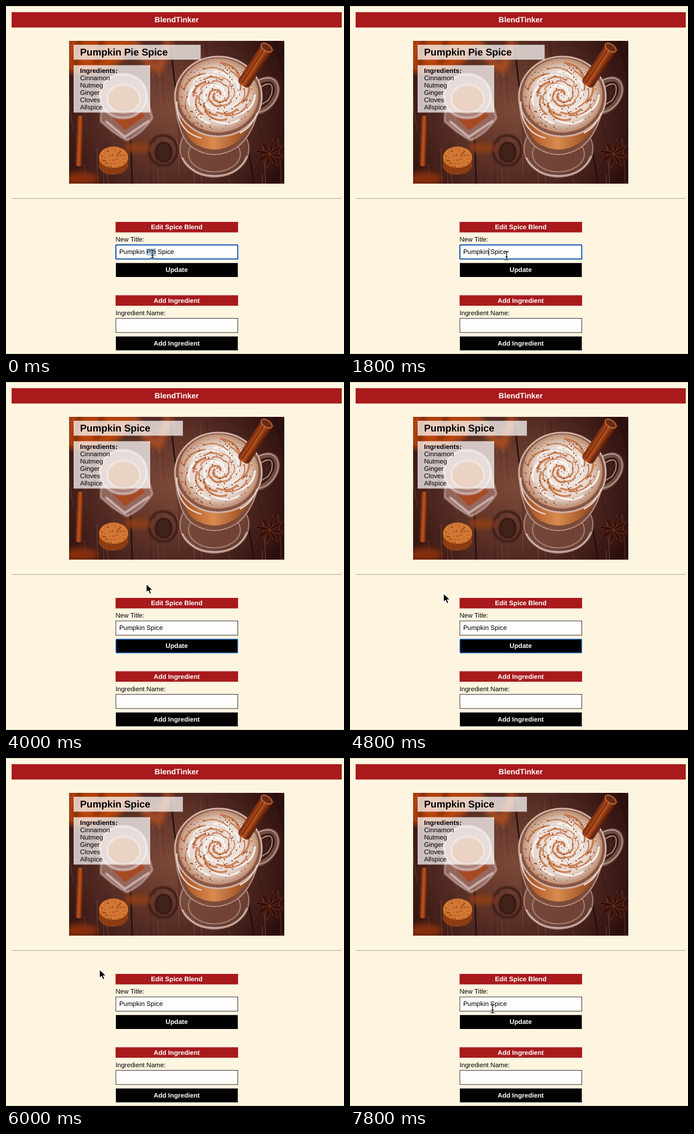
These frames come from a looping animation (600 by 619 pixels, 8000 ms). An HTML page:

```html
<!DOCTYPE html>
<html lang="en">
<head>
<meta charset="utf-8">
<title>Spice blend editor</title>
<style>
  html, body { margin: 0; width: 100%; height: 100%; overflow: hidden; background: #fef5e1; }
  svg { display: block; width: 600px; height: 619px; }
  text { font: 11.6px "Liberation Sans", Arial, sans-serif; text-rendering: geometricPrecision; white-space: pre; }
  .bold { font-weight: bold; }
  .heading { font-weight: bold; fill: #fff; text-anchor: middle; }
  .brand { font-size: 13.6px; }
  .title { font-size: 17.4px; font-weight: bold; }
  .bar { fill: #a81a1c; }
  .panel { fill: #fff; fill-opacity: .72; }
  .field { fill: #fffdfb; stroke: #3f3033; }
  .filler { font-size: 45px; font-weight: bold; letter-spacing: 8px; text-anchor: middle; stroke: #000; stroke-width: 1.4px; }

  .timed { animation: 8s step-end infinite; }
  .selection  { animation-name: selection; }
  .spaced     { animation-name: spaced; }
  .caret      { animation-name: caret; }
  .edited     { animation-name: edited; }
  .input-ring { animation-name: input-ring; }
  .hover      { animation-name: hover; }
  .press-ring { animation-name: press-ring; }
  .focus-ring { animation-name: focus-ring; }
  .old-title  { animation-name: old-title; }
  .new-title  { animation-name: new-title; }
  .photo      { animation-name: photo; }
  .empty      { animation-name: empty; }
  .card       { animation-name: card; }
  .beam       { animation-name: beam; }
  .hand       { animation-name: hand; }
  .arrow      { animation-name: arrow; }
  .pointer    { animation: pointer 8s linear infinite; }

  @keyframes selection  { 0% { opacity: 1 } 12.5%, 100% { opacity: 0 } }
  @keyframes spaced     { 0% { opacity: 0 } 12.5% { opacity: 1 } 15%, 100% { opacity: 0 } }
  @keyframes caret      { 0% { opacity: 0 } 15% { opacity: 1 } 32.5%, 100% { opacity: 0 } }
  @keyframes edited     { 0% { opacity: 0 } 15%, 100% { opacity: 1 } }
  @keyframes input-ring { 0% { opacity: 1 } 32.5%, 100% { opacity: 0 } }
  @keyframes hover      { 0% { opacity: 0 } 30% { opacity: 1 } 42.5%, 100% { opacity: 0 } }
  @keyframes press-ring { 0% { opacity: 0 } 32.5% { opacity: 1 } 42.5%, 100% { opacity: 0 } }
  @keyframes focus-ring { 0% { opacity: 0 } 42.5% { opacity: 1 } 65%, 100% { opacity: 0 } }
  @keyframes old-title  { 0% { opacity: 1 } 37.5%, 100% { opacity: 0 } }
  @keyframes new-title  { 0% { opacity: 0 } 37.5%, 100% { opacity: 1 } }
  @keyframes photo      { 0% { opacity: 1 } 65% { opacity: 0 } 72.5%, 100% { opacity: 1 } }
  @keyframes empty      { 0% { opacity: 0 } 65% { opacity: 1 } 72.5%, 100% { opacity: 0 } }
  @keyframes card       { 0% { transform: none } 65% { transform: translateX(63.7px) } 72.5%, 100% { transform: none } }
  @keyframes beam       { 0% { opacity: 1 } 30% { opacity: 0 } 42.5% { opacity: 1 } 45% { opacity: 0 } 95%, 100% { opacity: 1 } }
  @keyframes hand       { 0% { opacity: 0 } 30% { opacity: 1 } 42.5%, 100% { opacity: 0 } }
  @keyframes arrow      { 0% { opacity: 0 } 45% { opacity: 1 } 95%, 100% { opacity: 0 } }
  @keyframes pointer {
    0%          { transform: translate(260px, 441px) }
    7.5%        { transform: translate(260px, 441px); animation-timing-function: steps(3) }
    15%         { transform: translate(278px, 444px) }
    25%         { transform: translate(278px, 444px); animation-timing-function: steps(3) }
    32.5%       { transform: translate(296px, 474px) }
    40%         { transform: translate(296px, 474px); animation-timing-function: steps(4) }
    50%         { transform: translate(249px, 359px); animation-timing-function: steps(4) }
    60%         { transform: translate(166px, 376px) }
    85%         { transform: translate(166px, 376px); animation-timing-function: steps(5) }
    97.5%, 100% { transform: translate(253px, 446px) }
  }
</style>
</head>
<body>
<svg viewBox="0 0 600 619">
  <defs>
    <clipPath id="frame"><rect x="112.5" y="62" width="381.5" height="253.5"/></clipPath>
    <clipPath id="cup"><ellipse cx="377" cy="159" rx="71" ry="66"/></clipPath>
    <filter id="soft" x="-30%" y="-30%" width="160%" height="160%"><feGaussianBlur stdDeviation="5"/></filter>
    <filter id="fine"><feGaussianBlur stdDeviation=".8"/></filter>
    <radialGradient id="wood" gradientUnits="userSpaceOnUse" cx="290" cy="185" r="225">
      <stop offset="0" stop-color="#7b4939"/><stop offset=".45" stop-color="#5d3127"/><stop offset="1" stop-color="#2c100e"/>
    </radialGradient>
    <radialGradient id="cream">
      <stop offset="0" stop-color="#eee5e2"/><stop offset=".7" stop-color="#e6d9d2"/><stop offset="1" stop-color="#bd8c70"/>
    </radialGradient>
    <linearGradient id="coffee" x1="0" x2="1">
      <stop offset="0" stop-color="#a74e1d"/><stop offset=".45" stop-color="#d98c50"/><stop offset="1" stop-color="#8d3d17"/>
    </linearGradient>
    <linearGradient id="stick" x1="0" x2="1">
      <stop offset="0" stop-color="#74270d"/><stop offset=".45" stop-color="#bb5720"/><stop offset="1" stop-color="#4e1708"/>
    </linearGradient>
  </defs>

  <rect width="600" height="619" fill="#fef5e1"/>
  <path d="M0 .5H600M0 618.5H600" stroke="#d6d0c3"/>
  <rect class="bar" x="10" y="11" width="586" height="27.3"/>
  <text class="heading brand" x="303" y="29">BlendTinker</text>
  <path d="M10 342.3H596" stroke="#a3a09b"/>

  <g class="timed photo" clip-path="url(#frame)">
    <rect x="112" y="62" width="383" height="254" fill="url(#wood)"/>
    <g id="grain" fill="none"></g>
    <g fill="none" stroke="#24100d" stroke-width="2.5">
      <path d="M221 230L224 316M291 62L301 150M427 235L440 316M478 62L494 130"/>
    </g>
    <g fill="none" stroke="#2f1712" filter="url(#fine)">
      <ellipse cx="279" cy="257" rx="25" ry="27" stroke="#3d1e17" stroke-width="4"/>
      <ellipse cx="280" cy="260" rx="14" ry="17" fill="#402018" stroke-width="3"/>
    </g>
    <g filter="url(#soft)">
      <path d="M108 58H222Q216 104 178 111Q140 128 108 115Z" fill="#b74408"/>
      <path d="M132 60Q122 85 125 114M171 60L160 104" stroke="#642006" stroke-width="8"/>
      <path d="M222 60L262 111M290 60L268 119" stroke="#a64c20" stroke-width="15"/>
      <ellipse cx="234" cy="252" rx="24" ry="9" fill="#8a3d16"/>
      <ellipse cx="133" cy="307" rx="31" ry="12" fill="#842e0c"/>
    </g>
    <rect x="125" y="195" width="12" height="90" rx="4" fill="url(#stick)" transform="rotate(2 131 240)"/>

    <g filter="url(#fine)">
      <path d="M170 165L168 205Q194 229 215 239Q244 225 260 199L245 145Z" fill="#a6796e" fill-opacity=".75" stroke="#cdb5b0" stroke-width="2"/>
      <path d="M181 190L211 221L247 196L232 174Z" fill="#a74a20"/>
      <path d="M177 205L211 233L254 204" fill="none" stroke="#d9c8c8" stroke-width="3"/>
      <ellipse cx="208" cy="160" rx="42" ry="39" fill="#aa8178" stroke="#d3bfba" stroke-width="3"/>
      <ellipse cx="209" cy="165" rx="29" ry="25" fill="#b6602c" stroke="#dfc5b5" stroke-width="2"/>
    </g>
    <path d="M165 274V286Q169 301 192 300Q215 298 217 284V268Z" fill="#8b3c13"/>
    <ellipse cx="191" cy="269" rx="26" ry="19" fill="#d27732"/>
    <g id="cork" fill="#8c3e17"></g>

    <g fill="none" stroke="#b58d80" stroke-opacity=".8">
      <path d="M447 136Q466 124 477 134Q488 149 474 170Q463 186 446 189" stroke-width="9" stroke-opacity=".45"/>
      <path d="M445 134Q466 122 478 133Q490 149 475 172Q464 187 445 190M451 145Q467 134 472 142Q475 155 465 168L449 178" stroke-width="1.8" stroke="#d0b4a9"/>
      <ellipse cx="370" cy="254" rx="61" ry="50" fill="#895d4f" fill-opacity=".5" stroke-width="2.5"/>
      <ellipse cx="370" cy="263" rx="46" ry="32" fill="#754434" fill-opacity=".5" stroke-width="2"/>
      <path d="M313 270Q332 304 374 302Q414 300 428 267" stroke="#d9c1b7" stroke-width="3"/>
    </g>
    <path d="M300 169Q306 236 333 253Q371 276 409 252Q439 231 451 173Z" fill="#7c4b3c" stroke="#b99484" stroke-width="2"/>
    <path d="M312 202Q317 233 338 247Q372 264 403 246Q427 232 437 199Z" fill="url(#coffee)"/>
    <ellipse cx="377" cy="161" rx="77" ry="71" fill="#895444" stroke="#ceb2a5" stroke-width="3"/>
    <ellipse cx="377" cy="159" rx="71" ry="66" fill="url(#cream)"/>
    <g clip-path="url(#cup)">
      <g id="swirls" fill="none" stroke-linecap="round"></g>
      <g id="sprinkles" fill="#963b13"></g>
    </g>
    <path d="M303 170Q303 224 347 235M446 190Q436 216 415 226" fill="none" stroke="#e2d0c7" stroke-width="2.5"/>
    <g transform="translate(442 106) rotate(33)">
      <rect x="-11" y="-42" width="23" height="84" rx="7" fill="url(#stick)"/>
      <path d="M-2 -37V39M7 -37V36" stroke="#752a0e" stroke-width="2"/>
      <ellipse cy="-38" rx="11" ry="6" fill="#6b2a12" stroke="#b9693b" stroke-width="2"/>
    </g>
    <g id="anise" fill="#351009" stroke="#642b1c"></g>
  </g>

  <g class="timed empty">
    <rect x="176" y="62" width="254" height="253.5" fill="#ececec"/>
    <g transform="translate(302.5 0) scale(.43 1)">
      <text class="filler" y="157">Image</text>
      <text class="filler" y="202.5">goes</text>
      <text class="filler" y="248">here</text>
    </g>
  </g>

  <g class="timed card">
    <g class="timed old-title">
      <rect class="panel" x="120" y="69" width="225.5" height="26.5"/>
      <text class="title" x="131.5" y="88">Pumpkin Pie Spice</text>
    </g>
    <g class="timed new-title">
      <rect class="panel" x="120" y="69" width="194" height="26.5"/>
      <text class="title" x="131.5" y="88">Pumpkin Spice</text>
    </g>
    <rect class="panel" x="120" y="105.3" width="136" height="84.2"/>
    <text class="bold" x="131.5" y="118.5">Ingredients:</text>
    <text x="131.5" y="131.6">Cinnamon</text>
    <text x="131.5" y="144.7">Nutmeg</text>
    <text x="131.5" y="157.8">Ginger</text>
    <text x="131.5" y="170.9">Cloves</text>
    <text x="131.5" y="184">Allspice</text>
  </g>

  <rect class="bar" x="194.5" y="384" width="217.5" height="18.7"/>
  <text class="heading" x="303" y="397.2">Edit Spice Blend</text>
  <text x="194.5" y="418.7">New Title:</text>
  <rect class="field" x="195" y="425" width="216.5" height="25.3"/>
  <rect class="timed input-ring" x="195.1" y="425.1" width="216.3" height="25" rx="1.5" fill="#fffdfb" stroke="#1c5cb8" stroke-width="2"/>
  <g class="timed selection">
    <rect x="249.2" y="431" width="17.5" height="13" fill="#aecdf5"/>
    <text x="201" y="441.2">Pumpkin Pie Spice</text>
  </g>
  <text class="timed spaced" x="201" y="441.2">Pumpkin  Spice</text>
  <text class="timed edited" x="201" y="441.2">Pumpkin Spice</text>
  <path class="timed caret" d="M246.6 431V444" stroke="#000"/>

  <rect x="195" y="457.2" width="216.5" height="24.8"/>
  <rect class="timed hover" x="195" y="457.2" width="216.5" height="24.8" fill="#1a1a1a"/>
  <rect class="timed press-ring" x="195.3" y="457.6" width="215.8" height="24.2" rx="1.5" fill="none" stroke="#b9c7df" stroke-width="1.4"/>
  <rect class="timed focus-ring" x="195.3" y="457.6" width="215.8" height="24.2" rx="1.5" fill="none" stroke="#1c5cb8" stroke-width="1.6"/>
  <text class="heading" x="303" y="473.3">Update</text>

  <rect class="bar" x="194.5" y="514.5" width="217.5" height="18.7"/>
  <text class="heading" x="303" y="527.7">Add Ingredient</text>
  <text x="194.5" y="549.5">Ingredient Name:</text>
  <rect class="field" x="195" y="555.6" width="216.5" height="25.2"/>
  <rect x="195" y="587.8" width="216.5" height="24.7"/>
  <text class="heading" x="303" y="604">Add Ingredient</text>

  <g class="pointer" stroke-linejoin="round">
    <g class="timed beam" fill="none">
      <path id="stem" d="M-3.5 -7.5Q0 -7.5 0 -5Q0 -7.5 3.5 -7.5M0 -5V5M-3.5 7.5Q0 7.5 0 5Q0 7.5 3.5 7.5M-2 2.5H2" stroke="#fff" stroke-width="2.6"/>
      <use href="#stem" style="stroke:#111"/>
      <path d="M-3.5 -7.5Q0 -7.5 0 -5Q0 -7.5 3.5 -7.5M0 -5V5M-3.5 7.5Q0 7.5 0 5Q0 7.5 3.5 7.5M-2 2.5H2" stroke="#111" stroke-width="1.3"/>
    </g>
    <g class="timed hand">
      <path d="M-3.5 1Q-2 -1 0 1L2 7Q3 4.5 5 6.5Q7 5 8 7.5Q10 7 10.5 9.5Q12 14 8.5 18H1.5Q-1 14 -5 11Q-7 8.5 -4.5 8L-1.5 9.5Z" fill="#fff" stroke="#111" stroke-width="1.2"/>
      <path d="M3 11V15M5.3 11V15M7.5 11V15" stroke="#111" stroke-width=".8"/>
    </g>
    <path class="timed arrow" d="M0 0V15.5L3.6 12.2L6.2 18L9 16.8L6.5 11.2H11.3Z" fill="#000" stroke="#fff" stroke-width="1.1"/>
  </g>
</svg>
<script>
  let seed = 17;
  const random = () => (seed = seed * 16807 % 2147483647) / 2147483647;
  const between = (low, high) => low + (high - low) * random();
  const fill = (id, count, draw) => {
    document.getElementById(id).innerHTML = Array.from({ length: count }, (_, i) => draw(i)).join("");
  };
  const dot = (cx, cy, radius) => {
    const angle = random() * 2 * Math.PI, reach = radius * Math.sqrt(random());
    return `<circle cx="${cx + reach * Math.cos(angle)}" cy="${cy + reach * Math.sin(angle) * .9}" r="${between(.4, 1.3)}"/>`;
  };

  fill("grain", 90, () => {
    const x = between(112, 494), y = between(60, 300), length = between(25, 120);
    const color = random() < .55 ? "#30150f" : "#926051";
    return `<path d="M${x} ${y}q${between(-4, 6)} ${length / 2} ${length * .07} ${length}"
      stroke="${color}" stroke-width="${between(.5, 2)}" opacity="${between(.15, .45)}"/>`;
  });
  fill("cork", 45, () => dot(191, 270, 21));
  // Broken arcs follow an inward spiral of whipped cream.
  fill("swirls", 46, i => {
    const radius = 66 - i * 1.35, start = i * 2.4;
    const point = (turn, shrink) => {
      const angle = start + turn, reach = radius * shrink;
      return `${376 + reach * Math.cos(angle)} ${158 + reach * .9 * Math.sin(angle)}`;
    };
    const color = i % 3 ? "#c56a32" : "#fff9f5";
    return `<path d="M${point(0, 1)}Q${point(.45, 1.08)} ${point(.9, .78)}"
      stroke="${color}" stroke-width="${between(1.5, 4)}" opacity=".8"/>`;
  });
  fill("sprinkles", 240, () => dot(374, 160, 68));
  fill("anise", 8, i => `<path transform="translate(468 263) rotate(${i * 45 + 12})" d="M0 0Q-6 -14 0 -27Q7 -14 0 0Z"/>`);
</script>
</body>
</html>
```
